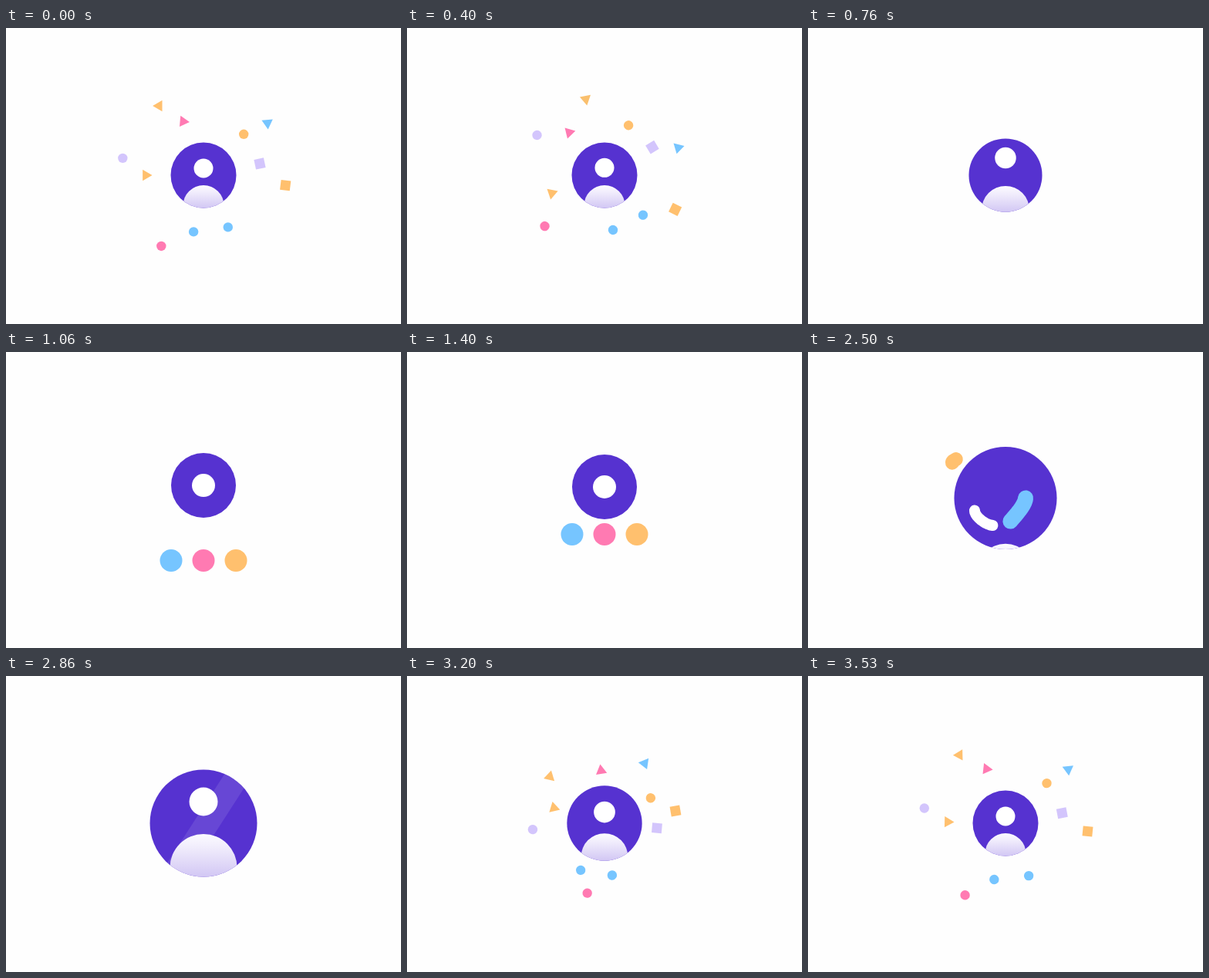
Recreate the animation shown at these times as an HTML page with a canvas. Size 512 px wide and 384 px high, loop 3560 ms.

```html
<!DOCTYPE html>
<html lang="en">
<head>
<meta charset="utf-8">
<title>Avatar loop</title>
<style>
html, body { margin: 0; width: 100%; height: 100%; overflow: hidden; background: #fefefe; }
canvas { display: block; width: 512px; height: 384px; }
</style>
</head>
<body>
<canvas id="stage" width="512" height="384"></canvas>
<script>
const LOOP = 3560, CX = 256, CY = 191, RAD = Math.PI / 180;
const PURPLE = '#5632d0', BLUE = '#76c5ff', PINK = '#ff7ab2', ORANGE = '#ffc06e', LILAC = '#d3c5fc';
const ctx = document.getElementById('stage').getContext('2d');

// Rows are [time, ...values]
const disc = [ // centre y, radius
  [0, 191, 42.5], [480, 191, 42.5], [760, 191, 47.5], [860, 190, 49], [1060, 173, 42],
  [1250, 176, 42], [1400, 175, 42], [1640, 172, 42], [2180, 172, 42], [2500, 189.5, 66.5],
  [2680, 191, 69.5], [2980, 191, 69.5], [3300, 191, 42.5], [LOOP, 191, 42.5]
];
const head = [ // x, y, diameter
  [0, 256, 182, 25], [480, 256, 181, 25], [760, 256, 168.5, 27.5], [860, 256, 171, 29],
  [1060, 256, 173, 30], [1250, 256, 176, 30], [1400, 256, 175, 30], [1640, 256, 172, 30],
  [2180, 256, 172, 30], [2330, 285, 192, 22], [2400, 272, 219, 16], [2450, 240, 225, 14],
  [2500, 216, 206, 14], [2560, 224, 175, 20], [2680, 256, 163, 36], [2860, 256, 163, 37],
  [2980, 256, 163, 37], [3300, 256, 181, 25], [LOOP, 256, 182, 25]
];
const body = [ // top, radius
  [0, 204, 26.5], [480, 204, 26.5], [760, 205, 31], [960, 252, 31], [2400, 268, 36],
  [2500, 249, 38], [2680, 205, 43], [2860, 205, 43.5], [2980, 205, 43.5], [3300, 204, 26.5], [LOOP, 204, 26.5]
];
const drop = [ // spread, y
  [880, 0, 200], [1040, 42, 262], [1070, 42, 272], [1250, 42, 234.5], [1400, 42, 236.5],
  [1600, 42, 239], [2150, 42, 239]
];
const bluePath = [
  [2150, 214, 239, 29], [2250, 214, 251, 29], [2370, 236, 246, 23], [2450, 262, 220, 20],
  [2500, 282, 190, 20], [2560, 284, 158, 14], [2630, 268, 140, 0]
];
const pinkPath = [[2150, 256, 239, 29], [2240, 256, 251, 29], [2400, 256, 200, 20], [2500, 256, 190, 0]];
const orangePath = [
  [2150, 298, 239, 29], [2230, 298, 251, 29], [2330, 272, 160, 22], [2400, 215, 128, 19],
  [2450, 192, 139, 18], [2500, 187, 143.5, 18], [2620, 220, 180, 12]
];
const orbit = [ // outer, inner radius
  [0, 107, 74.5], [280, 107, 74.5], [530, 89, 65], [740, 36, 32], [820, 15, 15], [3050, 25, 20],
  [3200, 93, 68], [3330, 132, 92], [3500, 107, 74.5], [LOOP, 107, 74.5]
];
// ring, kind, colour, angle, tilt
const bits = [
  [0, 'tri', ORANGE, -122.8, 180], [0, 'tri', BLUE, -39.2, 85], [0, 'box', ORANGE, 7, 7],
  [0, 'dot', PINK, 120.7, 0], [0, 'dot', LILAC, 191.9, 0],
  [1, 'tri', PINK, -110.4, 5], [1, 'dot', ORANGE, -45.5, 0], [1, 'box', LILAC, -11.6, -12],
  [1, 'dot', BLUE, 64.8, 0], [1, 'dot', BLUE, 100, 0], [1, 'tri', ORANGE, 180, 0]
];

const clamp = v => Math.max(0, Math.min(1, v));

// Monotone cubic through the rows
function at(rows, t) {
  const n = rows.length - 1;
  if (t <= rows[0][0]) return rows[0].slice(1);
  if (t >= rows[n][0]) return rows[n].slice(1);
  let i = 0;
  while (t >= rows[i + 1][0]) i++;
  const a = rows[i], b = rows[i + 1], h = b[0] - a[0], u = (t - a[0]) / h;
  const slope = (j, c) => j < 0 || j >= n ? 0 : (rows[j + 1][c] - rows[j][c]) / (rows[j + 1][0] - rows[j][0]);
  const tangent = (j, c) => {
    const p = slope(j - 1, c), q = slope(j, c);
    return p * q <= 0 ? 0 : 2 * p * q / (p + q);
  };
  return a.slice(1).map((_, k) => {
    const c = k + 1, u2 = u * u, u3 = u2 * u;
    return a[c] * (2 * u3 - 3 * u2 + 1) + b[c] * (3 * u2 - 2 * u3)
      + h * (tangent(i, c) * (u3 - 2 * u2 + u) + tangent(i + 1, c) * (u3 - u2));
  });
}

function circle(x, y, r, fill) {
  if (r <= 0) return;
  ctx.beginPath();
  ctx.arc(x, y, r, 0, 7);
  ctx.fillStyle = fill;
  ctx.fill();
}

function streak(rows, t, color, lag) {
  const [x, y, d] = at(rows, t);
  if (d < 0.3) return;
  ctx.beginPath();
  ctx.moveTo(x, y);
  for (let k = 1; k <= 10; k++) {
    const p = at(rows, t - lag * k / 10);
    ctx.lineTo(p[0], p[1] + 0.01);
  }
  ctx.lineCap = ctx.lineJoin = 'round';
  ctx.lineWidth = d;
  ctx.strokeStyle = color;
  ctx.stroke();
}

function confetti(t) {
  if (t > 840 && t < 3050) return;
  const radii = at(orbit, t), turn = 0.047 * (t > 2000 ? t - LOOP : t);
  bits.forEach(([ring, kind, color, angle, tilt], i) => {
    const late = i === 0 && t < 2000 ? clamp((t - 400) / 360) : 0;
    const spin = ring ? -turn : turn + 12 * late;
    const r = radii[ring] + (t < 800 ? 12 * late : 0), a = (angle + spin) * RAD;
    ctx.save();
    ctx.translate(CX + r * Math.cos(a), CY + r * Math.sin(a));
    ctx.rotate((tilt + spin) * RAD);
    ctx.fillStyle = late > 0 ? `rgb(250,${192 - 66 * late},${110 + 8 * late})` : color;
    ctx.beginPath();
    if (kind === 'dot') ctx.arc(0, 0, 6.2, 0, 7);
    else if (kind === 'box') ctx.rect(-6.4, -6.4, 12.8, 12.8);
    else {
      ctx.moveTo(8, 0);
      ctx.lineTo(-4.4, 7.2);
      ctx.lineTo(-4.4, -7.2);
    }
    ctx.fill();
    ctx.restore();
  });
}

function torso(t, cy, r) {
  if (t > 960 && t < 2400) return;
  const [top, br] = at(body, t), end = cy + r;
  if (top >= end) return;
  const g = ctx.createLinearGradient(0, top, 0, Math.max(end, top + br));
  g.addColorStop(0, '#fcfbff');
  g.addColorStop(0.3, '#f1edfc');
  g.addColorStop(1, '#d2c7f4');
  circle(CX, top + br, br, g);
}

function shine(t) {
  const alpha = 0.1 * clamp((t - 2680) / 80) * clamp((3020 - t) / 80);
  if (!alpha) return;
  const x = 289 + (t - 2860) * 0.32;
  ctx.fillStyle = `rgba(255,255,255,${alpha})`;
  ctx.beginPath();
  ctx.moveTo(x + 5, 110);
  ctx.lineTo(x + 42, 110);
  ctx.lineTo(x - 61, 270);
  ctx.lineTo(x - 98, 270);
  ctx.fill();
}

function draw(t) {
  ctx.fillStyle = '#fefefe';
  ctx.fillRect(0, 0, 512, 384);
  confetti(t);
  const [cy, r] = at(disc, t);

  if (t > 880 && t < 2150) {
    const [dx, y] = at(drop, t);
    [BLUE, PINK, ORANGE].forEach((c, i) => circle(CX + (i - 1) * dx, y, 14.5, c));
  } else if (t >= 2150 && t < 2620) {
    streak(pinkPath, t, PINK, 30);
    streak(orangePath, t, ORANGE, 50);
  }

  circle(CX, cy, r, PURPLE);
  ctx.save();
  ctx.beginPath();
  ctx.arc(CX, cy, r, 0, 7);
  ctx.clip();
  shine(t);
  torso(t, cy, r);
  ctx.restore();

  streak(head, t, '#fff', t > 2180 && t < 2740 ? 50 : 0);
  if (t >= 2150 && t < 2630) streak(bluePath, t, BLUE, 50);
}

const start = performance.now();
function tick() {
  draw((performance.now() - start) % LOOP);
  requestAnimationFrame(tick);
}
tick();
</script>
</body>
</html>
```
